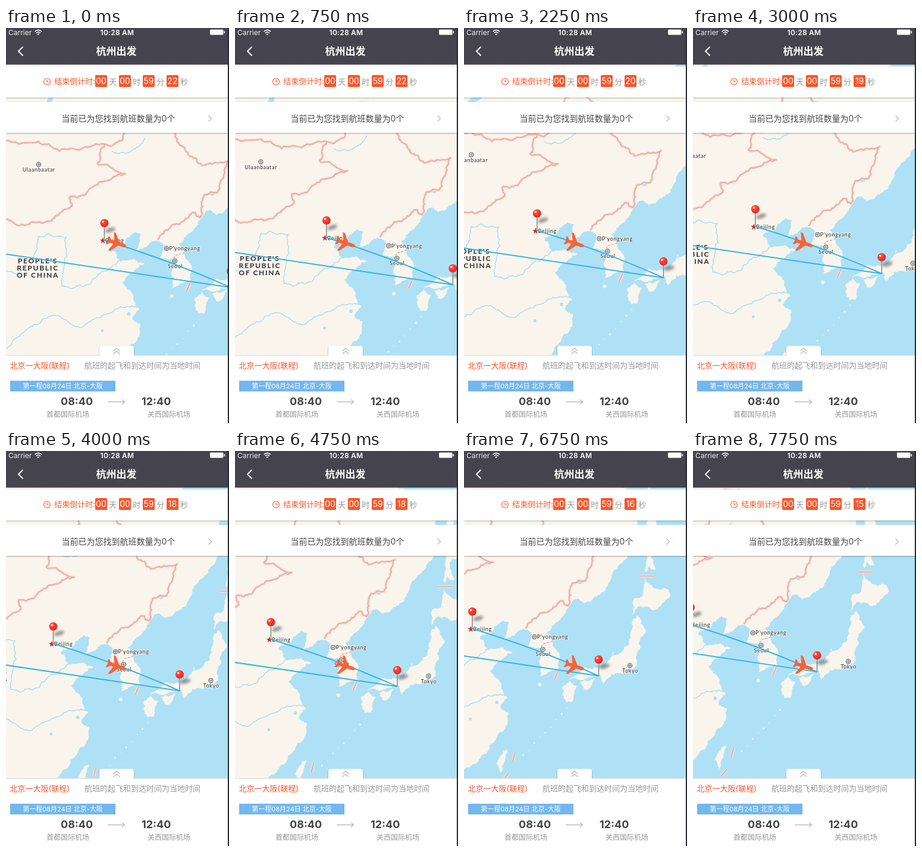
These frames come from a looping animation (375x663 px, 8 s). An HTML page:

```html
<!DOCTYPE html>
<html lang="zh-CN">
<head>
<meta charset="utf-8">
<title>Flight map</title>
<style>
html, body { margin: 0; width: 100%; height: 100%; overflow: hidden; background: #fff; }
svg { display: block; }
text { font-family: Inter, "Noto Sans CJK SC", "Noto Sans CJK", sans-serif; }
.land { fill: #f9f5ed; }
.lake { fill: #aee1f6; }
.river { fill: none; stroke: #a9dff5; stroke-width: 1.5; }
.baikal { fill: none; stroke: #aee1f6; stroke-width: 8; }
.glow { fill: none; stroke: #f7d9d2; stroke-width: 4.5; stroke-linejoin: round; }
.border { fill: none; stroke: #e79a92; stroke-width: 1.2; stroke-linejoin: round; }
.dash { stroke-dasharray: 4 2; }
.place text { font: 500 9px Lato, sans-serif; letter-spacing: .65px; fill: #3c3c3c; paint-order: stroke; stroke: #fbf8f2; stroke-width: 1.5px; }
.place .country { font-size: 12px; font-weight: 800; letter-spacing: 1.7px; }
.ring { fill: #fff; stroke: #444; stroke-width: 1; }
.route { fill: none; stroke: #36b5e2; stroke-width: 2; }
.orange { fill: #f9562b; }
.gray { fill: #979797; }
.ink { fill: #444; }
.thin { fill: none; stroke: #bdbdbd; stroke-width: 1.4; }
.mid { text-anchor: middle; }
</style>
</head>
<body>
<svg width="375" height="663" viewBox="0 0 375 663">
  <defs>
    <clipPath id="stage"><rect y="61" width="373" height="489"/></clipPath>
    <filter id="soft" x="-60%" y="-90%" width="220%" height="280%"><feGaussianBlur stdDeviation="2"/></filter>
    <filter id="drop" x="-5%" y="-20%" width="110%" height="150%"><feDropShadow dx="0" dy="1" stdDeviation="1" flood-opacity=".35"/></filter>
    <radialGradient id="ball" cx=".35" cy=".3" r=".8">
      <stop offset="0" stop-color="#ff6a5c"/><stop offset=".4" stop-color="#fb3a30"/><stop offset="1" stop-color="#e02420"/>
    </radialGradient>
    <pattern id="weave" width="6" height="6" patternUnits="userSpaceOnUse">
      <rect width="6" height="6" fill="#46444f"/>
      <path d="M0 1h2M3 4h2" stroke="#3f3d48"/>
    </pattern>
    <g id="pin">
      <ellipse cx="10" cy="-16.5" rx="9" ry="3.8" transform="rotate(-18 10 -16)" fill="#333" opacity=".48" filter="url(#soft)"/>
      <path d="M0 0V-22" stroke="#8d8d8d" stroke-width="1.6"/>
      <circle cy="-28" r="7" fill="url(#ball)"/>
      <circle cx="-2.4" cy="-30.4" r="1.7" fill="#fff" opacity=".85"/>
    </g>
    <g id="spot"><circle r="3.7" class="ring"/><circle r="1.5" class="ring"/></g>
  </defs>

  <g clip-path="url(#stage)">
    <rect y="61" width="373" height="489" fill="#aee1f6"/>
    <g id="map">
      <g id="terrain"></g>
      <g class="place">
        <use href="#spot" x="55" y="229"/><text class="mid" x="55.3" y="241">Ulaanbaatar</text>
        <use href="#spot" x="270" y="370"/><text x="274.5" y="373">P'yongyang</text>
        <use href="#spot" x="284" y="391"/><text class="mid" x="284.5" y="402.5">Seoul</text>
        <use href="#spot" x="430.5" y="418"/><text class="mid" x="431" y="430">Tokyo</text>
        <path d="M163 351.5l1.3 3.7 3.9.1-3.1 2.4 1.1 3.8-3.2-2.2-3.2 2.2 1.1-3.8-3.1-2.4 3.9-.1z" fill="#d8281f"/>
        <text x="167" y="360">Beijing</text>
        <text class="mid country" x="53.5" y="395">PEOPLE'S</text>
        <text class="mid country" x="53.5" y="407">REPUBLIC</text>
        <text class="mid country" x="53.5" y="419">OF CHINA</text>
      </g>
      <path class="route" d="M164.5 356Q271 388 378 435.5L-200 350"/>
      <use href="#pin" x="165.5" y="355.5"/>
      <use href="#pin" x="378" y="436"/>
    </g>
    <path transform="translate(185.7 361) rotate(18) scale(1.03)" fill="#fa6236" d="M16.5 0Q16-2.7 11-2.9L4-2.9-6-15.5H-9.5L-4.5-2.9-10-2.5-13.5-6.5H-16.3L-14.5 0-16.3 6.5H-13.5L-10 2.5-4.5 2.9-9.5 15.5H-6L4 2.9 11 2.9Q16 2.7 16.5 0z"/>
  </g>

  <rect width="373" height="61.5" fill="url(#weave)"/>
  <g fill="#fff">
    <text x="4" y="11.5" font-size="12" fill="#eee">Carrier</text>
    <text class="mid" x="187" y="11.5" font-size="12" font-weight="600" letter-spacing=".25">10:28 AM</text>
    <g fill="none" stroke="#fff" stroke-width="1.6">
      <path d="M48.5 6Q54.3.8 60 6M50.7 8.3Q54.3 5.2 57.8 8.3"/>
      <path d="M28.5 31.5L21 39 28.5 46.5" stroke-width="2"/>
    </g>
    <circle cx="54.3" cy="10.4" r="1.5"/>
    <rect x="343" y="2.5" width="22.5" height="9" rx="1.5"/><rect x="366.5" y="5" width="1.6" height="4" rx=".8"/>
    <text class="mid" x="185.5" y="45.3" font-size="17" font-weight="700">杭州出发</text>
  </g>

  <g fill="#fff" filter="url(#drop)">
    <rect y="64.5" width="373" height="52"/>
    <rect y="124" width="373" height="52"/>
  </g>
  <g fill="none" stroke="#f9562b" stroke-width="1.1"><circle cx="69" cy="90" r="5.5"/><path d="M69 86.3V90.3H72"/></g>
  <text class="orange" x="81.3" y="94.3" font-size="13" font-weight="500">结束倒计时:</text>
  <g id="timer" font-size="13"></g>
  <text class="mid ink" x="189" y="157.3" font-size="14">当前已为您找到航班数量为0个</text>
  <path class="thin" d="M340.5 147L345.5 152 340.5 157"/>

  <g fill="#fff" filter="url(#drop)"><path d="M157 551V538Q157 533.5 161 533.5H211Q215 533.5 215 538V551z"/></g>
  <path d="M0 549.5H373" stroke="#d9d9d9"/>
  <rect y="550" width="373" height="113" fill="#fff"/>
  <rect x="157.5" y="545" width="57" height="6" fill="#fff"/>
  <path class="thin" d="M180.5 542L186 537.5 191.5 542M180.5 547L186 542.5 191.5 547"/>
  <g font-size="13">
    <text class="orange" x="6.5" y="571.3">北京一大阪(联程)</text>
    <text class="gray" x="132" y="571.3">航班的起飞和到达时间为当地时间</text>
  </g>
  <rect x="7" y="592" width="177" height="18" fill="#73b7ee"/>
  <text class="mid" x="95.5" y="605" font-size="11" fill="#fff">第一程08月24日 北京-大阪</text>
  <g class="ink" font-size="18" font-weight="700"><text x="92" y="633">08:40</text><text x="228" y="633">12:40</text></g>
  <path class="thin" d="M171 627.5H199M195 623.5L199.5 627.5 195 631.5"/>
  <g class="gray" font-size="12"><text x="68" y="653.3">首都国际机场</text><text x="238" y="653.3">关西国际机场</text></g>
  <rect x="373" width="2" height="663" fill="#272a31"/>
</svg>

<script>
// Web Mercator, 11.48 px per degree, anchored on Beijing
const SCALE = 11.48, RAD = Math.PI / 180;
const merc = lat => Math.asinh(Math.tan(lat * RAD)) / RAD;
const project = (lon, lat) => [163 + (lon - 116.4) * SCALE, 357 - (merc(lat) - merc(39.9)) * SCALE];
const points = s => s.trim().split(/\s+/).map(p => project(...p.split(',').map(Number)));

let seed = 7;
const rand = () => (seed = seed * 16807 % 2147483647) / 2147483647 - .5;

// Seeded midpoint displacement turns a few key points into ragged coasts and borders
function rough(pts, depth = 4) {
  if (!depth) return pts;
  const out = [pts[0]];
  for (let i = 1; i < pts.length; i++) {
    const [ax, ay] = pts[i - 1], [bx, by] = pts[i];
    const len = Math.hypot(bx - ax, by - ay) || 1;
    const k = rand() * Math.min(len * .45, 6) / len;
    out.push([(ax + bx) / 2 - (by - ay) * k, (ay + by) / 2 + (bx - ax) * k], pts[i]);
  }
  return rough(out, depth - 1);
}
const toPath = pts => 'M' + pts.map(p => p.map(v => v.toFixed(1)).join(' ')).join('L');
const line = s => toPath(rough(points(s)));
const area = s => {
  const p = points(s);
  return toPath(rough([...p, p[0]])) + 'z';
};
const dot = (lon, lat, r) => {
  const [x, y] = project(lon, lat);
  return `M${x - r} ${y}a${r} ${r} 0 1 0 ${2 * r} 0a${r} ${r} 0 1 0 ${-2 * r} 0z`;
};
const terrain = document.getElementById('terrain');
function draw(cls, ...parts) {
  const el = document.createElementNS('http://www.w3.org/2000/svg', 'path');
  el.setAttribute('class', cls);
  el.setAttribute('d', parts.join(''));
  terrain.append(el);
}

const mainland = `143,59 138,56.3 135.3,54.7 141,53.2 140.4,48.5 138.5,46.9 135.5,43.9 133,42.7 131.8,43.2 129.7,41.2
  127.5,39.5 129.4,37 129.2,35.2 126.4,34.4 126.7,37.6 124.8,38 125.3,39.5 124.2,39.9 121.2,38.8 122.1,40.6 121,40.9
  119.3,39.4 117.7,38.9 118.9,37.5 120.8,37.8 122.5,37.2 120.3,36.1 119.2,35 120.5,34 121.8,31.8 120.8,30.4 121.9,29.9
  121.5,28.2 119.6,26 116.5,23 113.6,22.2 95,19 95,59`;
const honshu = `140.9,41.5 142,39.5 141,38.2 140.8,35.7 139.9,35 139.7,35.5 138.8,34.8 137,34.7 135.8,33.5 135.3,34.6
  130.9,34 133,35.5 135.9,35.6 137.3,37.4 137.2,36.8 138.7,37.4 139.9,39 140,40.7`;
const hokkaido = '141.9,45.5 143.3,44.3 145.3,44.2 145.3,43.3 143.3,42 141,42.4 140.1,41.5 140.3,43.2 141.6,43.6';
const kyushu = '130.9,33.9 132,33.2 131.3,31.3 130.3,31.3 129.8,33.1';
const shikoku = '132.4,33.7 134.6,34.2 134.2,33.3 132.9,32.8';
const sakhalin = '142,46 142.1,50.5 142.6,54.3 144.6,48.8 142.8,48 143.4,46.2 142.4,46.7';
const taiwan = '121.8,25.2 121.4,23.6 120.85,22 120.1,23.2';
draw('land', ...[mainland, honshu, hokkaido, kyushu, shikoku, sakhalin, taiwan].map(area), dot(126.5, 33.4, 3));

// Island chain from Kyushu towards Taiwan
for (let i = 0; i < 9; i++) draw('land', dot(130.5 - i * .8, 30.4 - i * .75 + rand() * .3, 1.2 + rand()));

const yellow = '101,36 104.2,36.3 106.5,38.5 107,40.4 111,40.3 110.4,34.6 114.6,34.9 118.9,37.7';
const yangtze = '101,26 104.6,28.8 109.5,31 113,29.5 119,32.1 121.8,31.8';
const argun = '117.7,49.2 120.5,49.2 122.6,50.4';
draw('river', ...[yellow, yangtze, argun].map(line));
draw('baikal', line('103.8,51.5 108.6,53.6 109.6,55.6'));
draw('lake', dot(132.4, 45, 4), dot(120.2, 31.2, 3), dot(116.3, 29.1, 2.5));

const russia = `98,50.5 107,50.1 110,49.2 116.7,49.85 119.2,50.2 120.7,53.2 123.6,53.4 126.5,52 127.6,49.8 130.9,47.8
  134.8,48.3 133.2,45.1 131.2,44.8 130.6,42.4`;
const mongolia = '116.7,49.85 115.6,48 119.7,47 116.2,46.2 113.7,44.8 111.6,44.7 111.9,43.7 109.3,42.4 105,41.6 98,42.7';
const yalu = '130.6,42.4 129.9,43 128.1,42 126.9,41.7 124.4,40';
const straits = 'M446.5 268h25M303.5 442l6-14M233.5 579.5l4-16M216.5 611l10-12';
const borders = [russia, mongolia, yalu].map(line).join('') + straits;
draw('glow', borders);
draw('border', borders);
draw('border dash', toPath(points('126.7,37.9 127.1,38.25 128.3,38.5')));

// Countdown boxes
const timer = document.getElementById('timer');
timer.innerHTML = ['00天', '00时', '59分', '22秒'].map((s, i) => {
  const x = 150 + i * 40;
  return `<rect class="orange" x="${x}" y="79" width="20" height="20" rx="2"/>
    <text class="mid" x="${x + 10}" y="94.3" font-size="14" fill="#fff">${s.slice(0, 2)}</text>
    <text class="mid gray" x="${x + 29.7}" y="94.5">${s[2]}</text>`;
}).join('');
const seconds = timer.querySelectorAll('text')[6];
const map = document.getElementById('map');

// The map pans in discrete steps, speeding up and then slowing down
const LOOP = 8000, STEP = 250;
function frame(now) {
  const t = now % LOOP, n = Math.floor(t / STEP);
  const dx = n * (3.3555 + .1883 * n - .00388 * n * n);
  map.setAttribute('transform', `translate(${-dx} ${-dx * .383})`);
  seconds.textContent = 22 - Math.floor(t / 1000);
}
const start = performance.now();
function tick() {
  frame(performance.now() - start);
  requestAnimationFrame(tick);
}
tick();
</script>
</body>
</html>
```
